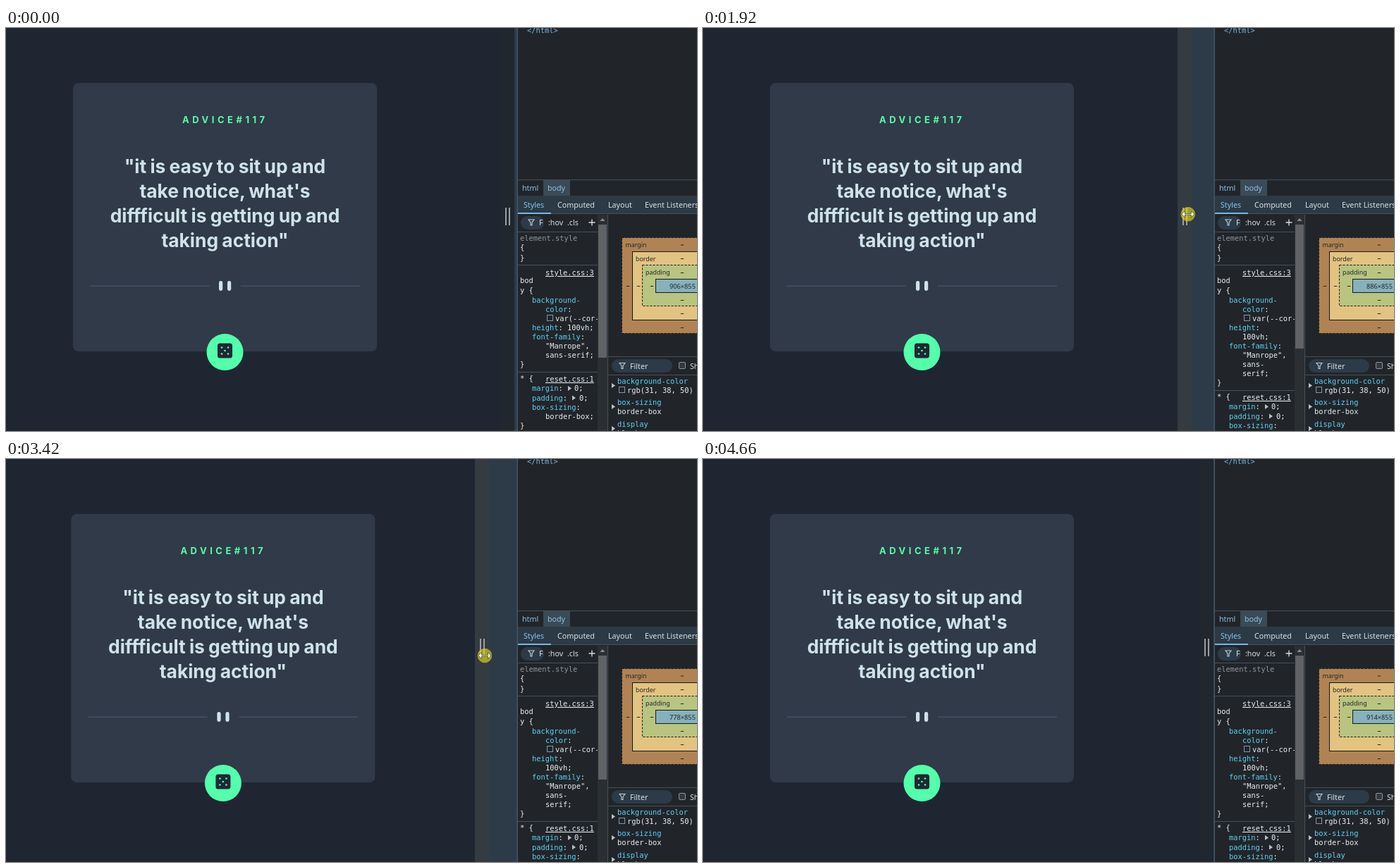
Animation of 980x572 px, one loop 5.39 s. Source, as an HTML page:

```html
<!DOCTYPE html>
<html lang="en">
<head>
<meta charset="utf-8">
<title>Resizing a responsive preview</title>
<style>
  html, body { margin: 0; width: 100%; height: 100%; overflow: hidden; background: #2c3b47; }
  svg { display: block; width: 980px; height: 572px; }
  text { white-space: pre; }
  .card { font-family: Inter, sans-serif; font-weight: 700; fill: #cee3e9; }
  .quote { font-size: 26.4px; word-spacing: -1px; text-anchor: middle; }
  .ui { font: 10.7px "Noto Sans", sans-serif; fill: #d8e0e6; }
  .mono { font: 10.4px "DejaVu Sans Mono", monospace; fill: #e9eef2; }
  .box { font: 8.9px "Noto Sans", sans-serif; fill: #23262a; }
  .prop { fill: #5fd0f5; }
  .link { text-decoration: underline; }
</style>
</head>
<body>
<svg id="stage" viewBox="0 0 980 572"></svg>
<script>
const LOOP = 5390, STEP = 68.6, CENTER = 310.5;
const LINE = '#43515d', PILL = '#2d3b48', MINT = '#53ffaa', PALE = '#cee3e9';
const stage = document.getElementById('stage');

function add(parent, tag, attrs = {}, content) {
  const node = document.createElementNS('http://www.w3.org/2000/svg', tag);
  for (const name in attrs) node.setAttribute(name, attrs[name]);
  if (content !== undefined) node.textContent = content;
  return parent.appendChild(node);
}
const group = (parent, attrs) => add(parent, 'g', attrs);
const rect = (parent, x, y, width, height, fill, more) =>
  add(parent, 'rect', { x, y, width, height, fill, ...more });
const text = (parent, x, y, style, content, more) =>
  add(parent, 'text', { x, y, class: style, ...more }, content);
const path = (parent, d, attrs) => add(parent, 'path', { d, ...attrs });
const circle = (parent, cx, cy, r, fill) => add(parent, 'circle', { cx, cy, r, fill });
const code = (parent, x, y, content, style = '') => text(parent, x, y, 'mono ' + style, content);
const hline = (parent, x, y, width) => rect(parent, x, y, width, 1, LINE);
const triangle = (parent, x, y) => path(parent, `M${x} ${y - 3.5}l5 3.5l-5 3.5z`, { fill: '#b9c2c9' });
const swatch = (parent, x, y) => rect(parent, x + .5, y + .5, 8, 8, '#1f2632', { stroke: '#8b949b' });
const funnel = (parent, x, y) => path(parent, `M${x - 4} ${y - 4}h8l-3 4v4h-2v-4z`,
  { fill: 'none', stroke: '#c5ced5', 'stroke-width': 1.1 });

// "name: value" with the name in the property colour
function property(parent, x, y, name, value = '') {
  const line = code(parent, x, y);
  add(line, 'tspan', { class: 'prop' }, name);
  add(line, 'tspan', {}, ':' + value);
}

// Preview
const page = rect(stage, 0, 0, 701, 572, '#1f2632');
const card = group(stage);
rect(card, 95, 78, 431, 381, '#313a48', { rx: 8 });
text(card, 250, 134.5, 'card', 'ADVICE#117',
  { style: `font-size:13px;letter-spacing:4.5px;fill:${MINT}` });
['"it is easy to sit up and', "take notice, what's", 'diffficult is getting up and', 'taking action"']
  .forEach((line, i) => text(card, CENTER, 205.5 + i * 35.3, 'card quote', line));
for (const x of [119, 333]) rect(card, x, 365.6, 169, 1, '#4a5c76');
for (const x of [302, 314]) rect(card, x, 359, 5.2, 14, PALE, { rx: 2.4 });
circle(card, CENTER, 460, 26, MINT);
rect(card, 300, 447.5, 21, 21, '#202733', { rx: 3.5 });
for (const [dx, dy] of [[0, 0], [-4.5, -4.5], [4.5, -4.5], [-4.5, 4.5], [4.5, 4.5]])
  circle(card, CENTER + dx, 458 + dy, 1.35, MINT);

// Drag handle
const handle = group(stage);
const grip = rect(handle, 0, 0, 20, 572, '#20272e');
for (const x of [7, 12]) rect(handle, x, 255, 2, 25, '#9a9fa2');

// Developer tools
const tools = group(stage);
rect(tools, 725, 0, 255, 572, '#212529');
code(tools, 739, 7, '</html>').style.fill = '#79b4e2';
hline(tools, 725, 215, 255);
rect(tools, 762, 216, 38, 22, '#3a4a57');
for (const [x, label] of [[732, 'html'], [768, 'body']])
  text(tools, x, 231, 'ui', label, { style: 'fill:#8ebfe6' });
rect(tools, 725, 238, 255, 26, '#2c3a45');
for (const [x, label] of [[734, 'Styles'], [782, 'Computed'], [854, 'Layout'], [906, 'Event Listeners']])
  text(tools, x, 255, 'ui', label, x === 734 ? { style: 'fill:#83c5f3' } : {});
hline(tools, 725, 263, 255);
rect(tools, 725, 262, 48, 2, '#76b9e6');

// Style rules
const defs = add(stage, 'defs');
rect(add(defs, 'clipPath', { id: 'rulesClip' }), 725, 264, 114, 308);
rect(tools, 730, 267, 33, 19, PILL, { rx: 9.5 });
funnel(tools, 745, 276);
text(tools, 756, 280, 'ui', 'F');
text(tools, 769, 279.5, 'ui', ':hov', { 'font-weight': 600 });
text(tools, 796, 279.5, 'ui', '.cls', { 'font-weight': 600 });
path(tools, 'M826.5 276h9M831 271.5v9', { stroke: '#d8e0e6', 'stroke-width': 1.3 });

const rules = group(tools, { 'clip-path': 'url(#rulesClip)' });
hline(rules, 725, 289, 114);
code(rules, 729, 302, 'element.style').style.fill = '#8d959c';
code(rules, 729, 315, '{');
code(rules, 729, 330, '}');
hline(rules, 725, 336, 114);
code(rules, 765, 351, 'style.css:3', 'link');
code(rules, 729, 362, 'bod');
code(rules, 729, 376, 'y {');
code(rules, 746, 390, 'background-', 'prop');
property(rules, 765, 403, 'color');
swatch(rules, 767, 407);
code(rules, 779, 416, 'var(--cor-');

// The end of the body rule and everything below it, in both wrappings
function lowerRules(wrapped) {
  const g = group(rules);
  property(g, 746, 429, 'height', wrapped ? '' : ' 100vh;');
  if (wrapped) code(g, 765, 442, '100vh;');
  const family = group(g, { transform: `translate(0 ${wrapped ? 13 : 0})` });
  property(family, 746, 442, 'font-family');
  code(family, 765, 455, '"Manrope",');
  code(family, 765, 468, wrapped ? 'sans-' : 'sans-serif;');
  if (wrapped) code(family, 765, 481, 'serif;');
  const rest = group(g, { transform: `translate(0 ${wrapped ? 26 : 0})` });
  code(rest, 729, 481, '}');
  hline(rest, 725, 488, 114);
  code(rest, 729, 501, '* {');
  code(rest, 765, 502, 'reset.css:1', 'link');
  property(rest, 746, 515, 'margin');
  triangle(rest, 797, 511.5);
  code(rest, 806, 515, '0;');
  property(rest, 746, 529, 'padding');
  triangle(rest, 803, 525);
  code(rest, 813, 529, '0;');
  property(rest, 746, 542, 'box-sizing');
  code(rest, 765, 555, 'border-box;');
  code(rest, 729, 568, '}');
  return g;
}
const wide = lowerRules(false), narrow = lowerRules(true);

rect(tools, 839, 265, 14, 307, '#2b2f32');
path(tools, 'M842.5 274l3.5 -4l3.5 4z', { fill: '#8a8d90' });
const thumb = rect(tools, 840, 279, 12, 189, '#606264');
rect(tools, 853, 265, 1, 307, LINE);

// Box model
for (const [x, y, bottom, fill, dash] of [
  [873, 297, 434, '#b08354', '3 2'], [888, 317, 415, '#e3c381', ''],
  [902, 336, 395, '#b8c480', '3 2'], [921, 356, 376, '#87b1bc', '']
]) rect(tools, x + .5, y + .5, 2 * (959 - x) - 1, bottom - y - 1, fill,
  { stroke: '#15171a', 'stroke-dasharray': dash });
for (const [x, y, label] of [[878.5, 311, 'margin'], [893, 330.5, 'border'], [907, 350, 'padding']])
  text(tools, x, y, 'box', label);
const dash = (x, y) => rect(tools, x - 2.2, y - .5, 4.4, 1, '#23262a');
for (const y of [308, 327.5, 347.5, 386.5, 405.5, 425.5]) dash(959, y);
for (const x of [882, 897, 916]) dash(x, 366.5);
const sizeLabel = text(tools, 959.5, 369.5, 'box', '', { 'text-anchor': 'middle', style: 'font-size:9.2px' });

// Computed values
hline(tools, 854, 466, 126);
rect(tools, 859, 470, 86, 19, PILL, { rx: 9.5 });
funnel(tools, 874, 479.5);
text(tools, 885, 483.5, 'ui', 'Filter');
rect(tools, 954.5, 474.5, 9, 9, '#34393d', { stroke: '#8b949b', rx: 1.5 });
text(tools, 970, 483.5, 'ui', 'Show all');
hline(tools, 854, 492, 126);
for (const [y, name, value, indent] of [
  [505, 'background-color', 'rgb(31, 38, 50)', 14], [535, 'box-sizing', 'border-box', 0],
  [566, 'display', 'block', 0]
]) {
  triangle(tools, 859, y + 2.5);
  code(tools, 867, y, name, 'prop');
  code(tools, 867 + indent, y + 13, value);
}
swatch(tools, 869, 509);
rect(tools, 724.5, 0, 1.5, 572, '#41566a');

// Pointer
const press = circle(stage, 0, 0, 10.3, 'rgba(220,212,20,.68)');
const arrow = path(stage, 'M0 0v16l3.7-3.5l2.4 5.6l2.5-1.1l-2.4-5.4h5z',
  { fill: '#fff', stroke: '#111', 'stroke-width': .9 });
const resize = path(stage, 'M-9 0l4.5-4.5v3.7h9v-3.7l4.5 4.5l-4.5 4.5v-3.7h-9v3.7z',
  { fill: '#fff', stroke: '#222', 'stroke-width': .6 });

// Tracks: step, then values
const edgeTrack = [[24, 701], [25, 700], [26, 692], [28, 673], [30, 655], [32, 647.6], [34, 633],
  [37, 623], [40, 617], [43, 608], [46, 608], [48, 646], [50, 665], [53, 688], [56, 698], [60, 704.5]];
const pointerTrack = [[2, 962, 545], [4, 790, 415], [6, 585, 350], [8, 501, 313], [9, 513, 307],
  [11, 535, 302], [14, 610, 275], [16, 671, 256], [17, 664, 257], [18, 690, 260], [19, 709, 264],
  [20, 710.5, 263], [21, 710.5, 263], [22, 711, 262.5], [25, 711, 263], [32, 657, 266], [34, 642, 267],
  [43, 619, 268], [46, 619, 268], [48, 659, 275], [50, 679, 279], [53, 699, 279], [60, 714, 279],
  [62, 714, 279], [63, 730, 296], [67, 966, 556]];

function sample(track, step) {
  const next = track.findIndex(row => row[0] > step);
  if (next === 0) return track[0].slice(1);
  if (next < 0) return track[track.length - 1].slice(1);
  const a = track[next - 1], b = track[next], p = (step - a[0]) / (b[0] - a[0]);
  return a.slice(1).map((v, i) => v + (b[i + 1] - v) * p);
}
const show = (node, on) => node.setAttribute('visibility', on ? 'visible' : 'hidden');
const move = (node, x, y) => node.setAttribute('transform', `translate(${x} ${y})`);

function draw(time) {
  const step = Math.floor((time % LOOP + 11) / STEP);
  const edge = Math.floor(sample(edgeTrack, step)[0]);
  const [x, y] = sample(pointerTrack, step);
  const left = Math.max(0, 2 * CENTER - edge);

  page.setAttribute('x', left);
  page.setAttribute('width', edge - left);
  move(handle, edge, 0);
  grip.setAttribute('fill', step >= 20 && step < 63 ? '#343b41' : '#20272e');
  move(card, step >= 48 && step < 55 ? -2.6 : 0, 0);

  // The reported size trails the handle by two steps
  const [measured] = sample(edgeTrack, step - 2);
  sizeLabel.textContent = 2 * Math.round((measured - CENTER) * 1.16) + '×855';

  const wrapped = step >= 26;
  show(wide, !wrapped);
  show(narrow, wrapped);
  thumb.setAttribute('height', wrapped ? 176 : 189);

  const resizing = step >= 19 && step < 63;
  show(arrow, step >= 2 && step < 68 && !resizing);
  show(resize, resizing);
  show(press, step >= 25 && step < 62);
  for (const node of [arrow, resize, press]) move(node, x, y);
}

const start = performance.now();
function tick() {
  draw(performance.now() - start);
  requestAnimationFrame(tick);
}
tick();
</script>
</body>
</html>
```
